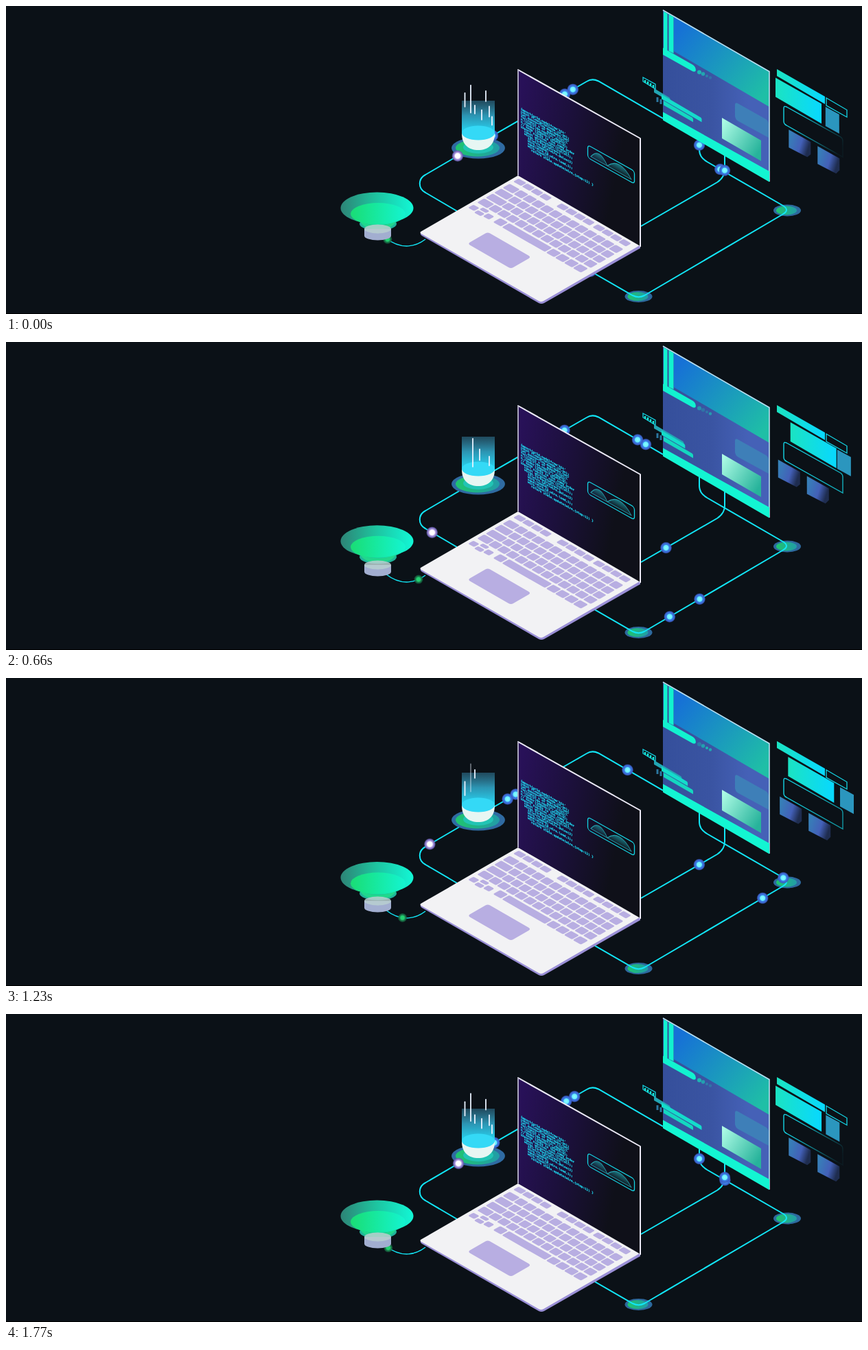
These frames come from a looping animation (1247x449 px, 1800 ms). An HTML page:

```html
<!DOCTYPE html>
<html lang="en">
<head>
<meta charset="utf-8">
<title>Connected devices</title>
<style>
  html, body { margin: 0; width: 100%; height: 100%; overflow: hidden; background: #0b1117; }
  svg { display: block; width: 100vw; height: 100vh; }
  .wire { fill: none; stroke: #12e6f6; stroke-width: 2; }
  .code { font: bold 4.2px "DejaVu Sans Mono", monospace; fill: #1fdcf2; stroke: #1fdcf2; stroke-width: .25; white-space: pre; }
  .outline { fill: none; stroke: #14d4e4; stroke-width: 1.3; }
</style>
</head>
<body>
<svg viewBox="0 0 1247 449" preserveAspectRatio="none">
  <defs>
    <linearGradient id="hero" x1="0" y1="0" x2="1" y2=".8"><stop offset=".1" stop-color="#1671d6"/><stop offset="1" stop-color="#1fbfa6"/></linearGradient>
    <linearGradient id="wall"><stop offset="0" stop-color="#354f9b"/><stop offset=".45" stop-color="#3a54a2"/><stop offset=".8" stop-color="#4561b7"/></linearGradient>
    <linearGradient id="mint" x1="0" y1="0" x2="1" y2=".7"><stop offset="0" stop-color="#b4ffe9"/><stop offset="1" stop-color="#27b39b"/></linearGradient>
    <linearGradient id="aqua"><stop offset="0" stop-color="#1be3c2"/><stop offset="1" stop-color="#08d8ff"/></linearGradient>
    <linearGradient id="chip" x1="0" y1="0" x2="1" y2=".4"><stop offset="0" stop-color="#3486b8"/><stop offset=".65" stop-color="#4360b8"/><stop offset="1" stop-color="#4360b8" stop-opacity=".35"/></linearGradient>
    <linearGradient id="fade" gradientUnits="userSpaceOnUse" x1="1133" y1="160" x2="1219" y2="205"><stop offset=".2" stop-color="#14d4e4"/><stop id="fadeEnd" offset="1" stop-color="#14d4e4"/></linearGradient>
    <linearGradient id="dish"><stop offset="0" stop-color="#2d8476"/><stop offset=".45" stop-color="#1fc09c"/><stop offset="1" stop-color="#12f7d6"/></linearGradient>
    <linearGradient id="bowl"><stop offset="0" stop-color="#16ee72"/><stop offset="1" stop-color="#14f6d2"/></linearGradient>
    <linearGradient id="ring"><stop offset="0" stop-color="#1fc56e"/><stop offset="1" stop-color="#229ca8"/></linearGradient>
    <linearGradient id="beam" x1="0" y1="0" x2="0" y2="1"><stop offset="0" stop-color="#2c6984" stop-opacity=".65"/><stop offset=".45" stop-color="#2c94b2"/><stop offset="1" stop-color="#27d9f6"/></linearGradient>
    <linearGradient id="screen" x1="0" y1=".2" x2="1" y2=".5"><stop offset="0" stop-color="#281158"/><stop offset=".4" stop-color="#1c103c"/><stop offset=".85" stop-color="#0f1019"/></linearGradient>
    <linearGradient id="hump" x1="0" y1="0" x2="0" y2="1"><stop offset="0" stop-color="#1f9aa4" stop-opacity=".75"/><stop offset="1" stop-color="#1f9aa4" stop-opacity=".1"/></linearGradient>
    <radialGradient id="blue"><stop offset="0" stop-color="#8ffaff"/><stop offset=".42" stop-color="#66eeff"/><stop offset=".52" stop-color="#3b86ea"/><stop offset=".85" stop-color="#3a5cc4"/><stop offset="1" stop-color="#3a5cc4" stop-opacity=".2"/></radialGradient>
    <radialGradient id="white"><stop offset=".42" stop-color="#fff"/><stop offset=".56" stop-color="#b9a6e6"/><stop offset=".85" stop-color="#6a5fae"/><stop offset="1" stop-color="#6a5fae" stop-opacity=".2"/></radialGradient>
    <radialGradient id="green"><stop offset=".4" stop-color="#22d070"/><stop offset=".6" stop-color="#1b8a52"/><stop offset="1" stop-color="#155a3c" stop-opacity=".6"/></radialGradient>
  </defs>

  <rect width="1247" height="449" fill="#0b1117"/>
  <rect y="448" width="1247" height="1" fill="#000"/>

  <g id="nodes"></g>
  <path id="leftWire" class="wire" d="M657 299L611 272C600 266 600 252 611 246L676 208"/>
  <path id="topWire" class="wire" d="M688 201L846 110Q854 105 863 109.500L957 163.800"/>
  <path id="loopWire" class="wire" d="M840 380L913 422Q921.500 426.500 930 422L1131 304Q1143 297.300 1131 290.500L1022 227.500C1013 222 1010 217 1010 209V190"/>
  <path id="rightWire" class="wire" d="M925 321L1036 257Q1047 250 1047 238V218"/>
  <path id="lampWire" class="wire" style="stroke-width:1.5" d="M611 340C598 350 577 357 553 338"/>

  <g>
    <ellipse cx="688" cy="207" rx="39" ry="15.500" fill="#2f6ba2"/>
    <ellipse cx="687" cy="207" rx="32" ry="12.500" fill="url(#ring)"/>
    <ellipse cx="688" cy="206" rx="22" ry="9" fill="#22c4b4"/>
  </g>
  <g id="dots"></g>

  <path d="M664 138H712V186H664Z" fill="url(#beam)"/>
  <path d="M664 186C664 202 674 210 688 210S712 202 712 186Z" fill="#e7f6f3"/>
  <ellipse cx="688" cy="185" rx="24" ry="10.500" fill="#34d9f6"/>
  <g id="streaks" stroke="#e9f3ff" stroke-width="1.800" stroke-linecap="round"></g>

  <g id="lamp">
    <ellipse cx="542" cy="315" rx="27" ry="10" fill="#20b49a"/>
    <ellipse cx="540.500" cy="292" rx="53" ry="23" fill="url(#dish)"/>
    <ellipse cx="542" cy="300.500" rx="40" ry="16" fill="url(#bowl)" opacity=".8"/>
    <path d="M516 312Q542 322 568 312Q562 323 542 323T516 312Z" fill="#20d88c"/>
  </g>
  <path d="M522 325V335A19.500 6.500 0 0 0 561 335V325Z" fill="#a2aed0"/>
  <ellipse cx="541.500" cy="325" rx="19.500" ry="6.500" fill="#b9cfd0" opacity=".85"/>

  <g id="monitor">
    <path d="M957 6L1112 95V256L957 166Z" fill="url(#wall)"/>
    <path d="M973 15L1112 95V147L973 66Z" fill="url(#hero)"/>
    <path d="M957 6L1112 95.500V256" fill="none" stroke="#b8def0" stroke-width="1.600"/>
    <path d="M957 154.500L1112 241V256.500L957 166.500Z" fill="#13f5d2"/>
    <path d="M958 8L963.500 11V65L958 62ZM965.500 12L972.500 16V69L965.500 65.500ZM957 61L1001 86Q1006 90 1004.500 95Q1002 97 998 94L957 71Z" fill="#12f2cf"/>
    <path d="M1066 142L1107 165Q1111 168 1111 172V192L1067 168Q1062 165 1062 160V144Q1062 140 1066 142Z" fill="#3e7fb8"/>
    <path d="M1043 163L1100 196V226L1043 193Z" fill="url(#mint)"/>
    <g id="bullets" fill="#1cb8b4"><circle cx="1010" cy="96.500" r="3"/><circle cx="1015.500" cy="99" r="2.800"/><circle cx="1021" cy="102" r="2"/><circle cx="1026" cy="104.500" r="2.200"/></g>
  </g>

  <g>
    <path class="outline" d="M928 104L946 114V121L928 110Z"/>
    <path d="M931 108v4M935 110v4M939 112.500v4M943 115v4" stroke="#16e8d8" stroke-width="2.500"/>
    <path d="M949 133v7M954 136v7" stroke="#2b77a0" stroke-width="3"/>
    <path id="barA" fill="#22a6b4"/><path id="barB" fill="#14dccb"/><path id="barC" fill="#14d8c0"/>
  </g>

  <g>
    <path d="M1123 92L1193 132V143L1123 102Z" fill="url(#aqua)"/>
    <path class="outline" d="M1195 134L1225 151.500V162L1195 145Z"/>
    <path id="card" d="M1134 112L1201 150V179L1134 140Z" fill="url(#aqua)"/>
    <path id="side" d="M1206 154L1226 165V193L1206 182Z" fill="#2b96be"/>
    <path d="M1137 147L1216 191Q1219 193 1219 197V220L1137 174Q1133 172 1133 168V149Q1133 145 1137 147Z" fill="none" stroke="url(#fade)" stroke-width="1.400"/>
    <g id="chips" fill="url(#chip)"><path d="M1131 175L1163 193V211L1158 215L1131 201Z"/><path d="M1173 199L1205 217V234L1200 239L1173 225Z"/></g>
  </g>

  <g id="laptop">
    <path d="M604 331L746 249L924 350V353L784 433Q780 435 776 433L606 335Q603 333 604 331Z" fill="#9a8fd6"/>
    <path d="M605 328.500L746 247L924 348.500L783 430Q779.500 432 776 430L605 332Q602 330 605 328.500Z" fill="#f2f2f4"/>
    <g id="keys" transform="matrix(.867 .5 -.867 .5 746 247)" fill="#b8aee2"></g>
    <path d="M746 93L924 193V350L746 247Z" fill="url(#screen)"/>
    <path d="M746 247V93L924 193V351" fill="none" stroke="#eceaf6" stroke-width="2" stroke-linejoin="round"/>
    <path d="M746 93V247" stroke="#6a6488" stroke-width="1"/>
    <g transform="matrix(1 .562 0 1 746 93)">
      <g id="code"></g>
      <path d="M106 67Q118 46 130 67ZM130 67Q148 44 165 67Z" fill="url(#hump)" stroke="#249fab"/>
      <rect class="outline" x="101.500" y="52.500" width="68" height="18.500" rx="4"/>
    </g>
  </g>
  <g id="frontDots"></g>
</svg>

<script>
const LOOP = 1800, STEP = 30, SLOPE = 0.575;
const $ = id => document.getElementById(id);

function add(parent, tag, attrs) {
  const el = document.createElementNS("http://www.w3.org/2000/svg", tag);
  for (const name in attrs) el.setAttribute(name, attrs[name]);
  return $(parent).appendChild(el);
}

function addNode(cx, cy) {
  add("nodes", "ellipse", { cx, cy, rx: 20, ry: 8.5, fill: "#2d699e" });
  add("nodes", "ellipse", { cx: cx - 1, cy, rx: 15, ry: 6.5, fill: "url(#ring)" });
}
addNode(1138, 298);
addNode(921.5, 423.5);

// Keyboard, drawn in the plane of the deck
const addKey = (x, y, width, height = 12) => add("keys", "rect", { x, y, width, height, rx: 1.8 });
for (const start of [5, 77, 138])
  for (let i = 0; i < 4; i++) addKey(start + i * 14.4, 4, 13, 9);
for (let row = 0; row < 4; row++) {
  const y = 19 + row * 14.3, first = 17 + row % 3 * 4;
  addKey(5, y, first);
  const pitch = (191 - first) / 12;
  for (let i = 0; i < 12; i++) addKey(6.4 + first + i * pitch, y, pitch - 1.4);
}
addKey(5, 80, 10, 9);
addKey(17, 76, 11, 6);
addKey(17, 84, 11, 7);
addKey(30, 80, 10, 9);
addKey(47, 77, 13);
addKey(62, 77, 72);
for (let i = 0; i < 4; i++) addKey(136 + i * 15, 77, 13.5);
add("keys", "rect", { x: 57, y: 108, width: 73, height: 34, rx: 4 });

const source = [
  "import{grid,node}from'kit'", "const flow=grid(node,24,on);", "let queue=flow.map(open,two)",
  "for(const n of queue.list){", "n.link(flow.next(n),depth)", "n.render({depth:2,width:9})",
  "// keep links in the same order", "export function sync(state){",
  "  const wires=state.list(all);", "  wires.forEach(wire=>{", "    if(wire.idle)wire.pulse(2)",
  "    wire.load=0;", "    send(wire.id,wire.load,1);",
  "    wire.reset();", "      return state.update(wire,{step:1}) }"
];
source.forEach((line, i) => {
  add("code", "text", { x: 4, y: 56 + i * 3.7, class: "code" }).textContent = line;
});

// wire, look, radius, start time, px per ms, period
const dots = [
  ["leftWire", "white", 8.5, 190, .0895, 1755],
  ["topWire", "blue", 8.5, -869, .183, 1755],
  ["topWire", "blue", 8.5, -794, .183, 1755],
  ["topWire", "blue", 8.5, -132, .183, 1755],
  ["loopWire", "blue", 8.5, 135, .2755, LOOP],
  ["loopWire", "blue", 8.5, -49, .2755, LOOP],
  ["rightWire", "blue", 8.5, 230, .098, 1755],
  ["lampWire", "green", 6.5, 380, .042, LOOP]
].flatMap(([wire, look, r, start, speed, period]) => [-1, 0, 1].map(turn => ({
  path: $(wire), length: $(wire).getTotalLength(), start: start + turn * period, speed,
  el: add(wire === "rightWire" ? "frontDots" : "dots", "circle", { r, fill: `url(#${look})` })
})));

// x, start time, top at start, end time, top at end, length
const streaks = [
  [668.5, 760, 171, 2150, 112, 20], [677, 1200, 126, 2060, 111, 40], [680, 420, 144, 1180, 134, 41],
  [683, 780, 169, 1420, 119, 12], [683, 1330, 180, 2080, 124, 12], [690, 180, 167, 900, 151, 16],
  [693, 1280, 166, 2080, 144, 14], [699, 1280, 135, 2080, 118, 15], [703, 700, 133, 1150, 123, 15],
  [704, 1250, 163, 2080, 138, 15], [704, 400, 172, 1180, 157, 13], [708, 1250, 172, 2080, 156, 12]
].map(data => ({ data, el: add("streaks", "line", { x1: data[0], x2: data[0] }) }));

const slide = (id, d) => $(id).setAttribute("transform", `translate(${d} ${d * SLOPE})`);

function drawBar(id, x, y, end, h) {
  const drop = (end - x) * SLOPE;
  $(id).setAttribute("d", `M${x} ${y}L${end - 1} ${y + drop}l1 2v${h - 2}L${x} ${y + h}Z`);
}

function moveDot({ el, path, length, start, speed }, t) {
  const s = (t - start) * speed, shown = s >= 0 && s <= length;
  el.style.display = shown ? "" : "none";
  if (!shown) return;
  const p = path.getPointAtLength(s);
  el.setAttribute("cx", p.x);
  el.setAttribute("cy", p.y);
}

function moveStreak({ el, data: [, t0, y0, t1, y1, length] }, t) {
  const time = t < t0 ? t + LOOP : t, k = (time - t0) / (t1 - t0);
  const y = y0 + (y1 - y0) * k;
  el.setAttribute("y1", y);
  el.setAttribute("y2", Math.min(y + length, 187));
  el.setAttribute("opacity", k > 1 ? 0 : Math.min(1, k * 12, (1 - k) * 12));
}

const swing = (t, delay = 0) => Math.cos((t - delay) / LOOP * 2 * Math.PI);

function draw(t) {
  const wave = swing(t);
  dots.forEach(dot => moveDot(dot, t));
  streaks.forEach(streak => moveStreak(streak, t));
  $("lamp").setAttribute("transform", `translate(0 ${2.5 * wave})`);
  drawBar("barA", 944, 120, 979.5 - 12 * wave, 6);
  drawBar("barB", 955, 129, 999 + 14.5 * wave, 6.5);
  drawBar("barC", 958, 138, 1001, 6.5);
  slide("card", -13 * wave);
  slide("side", -13 * swing(t, 100));
  slide("chips", 9.3 * wave);
  $("fadeEnd").setAttribute("stop-opacity", .05 + .45 * (1 - wave));
  [...$("bullets").children].forEach((dot, i) => {
    dot.setAttribute("opacity", .65 + .35 * Math.cos((t / 900 - i * .17) * 2 * Math.PI));
  });
}

const begin = performance.now();
function tick() {
  const t = (performance.now() - begin) % LOOP;
  draw(Math.floor(t / STEP) * STEP);
  requestAnimationFrame(tick);
}
tick();
</script>
</body>
</html>
```
